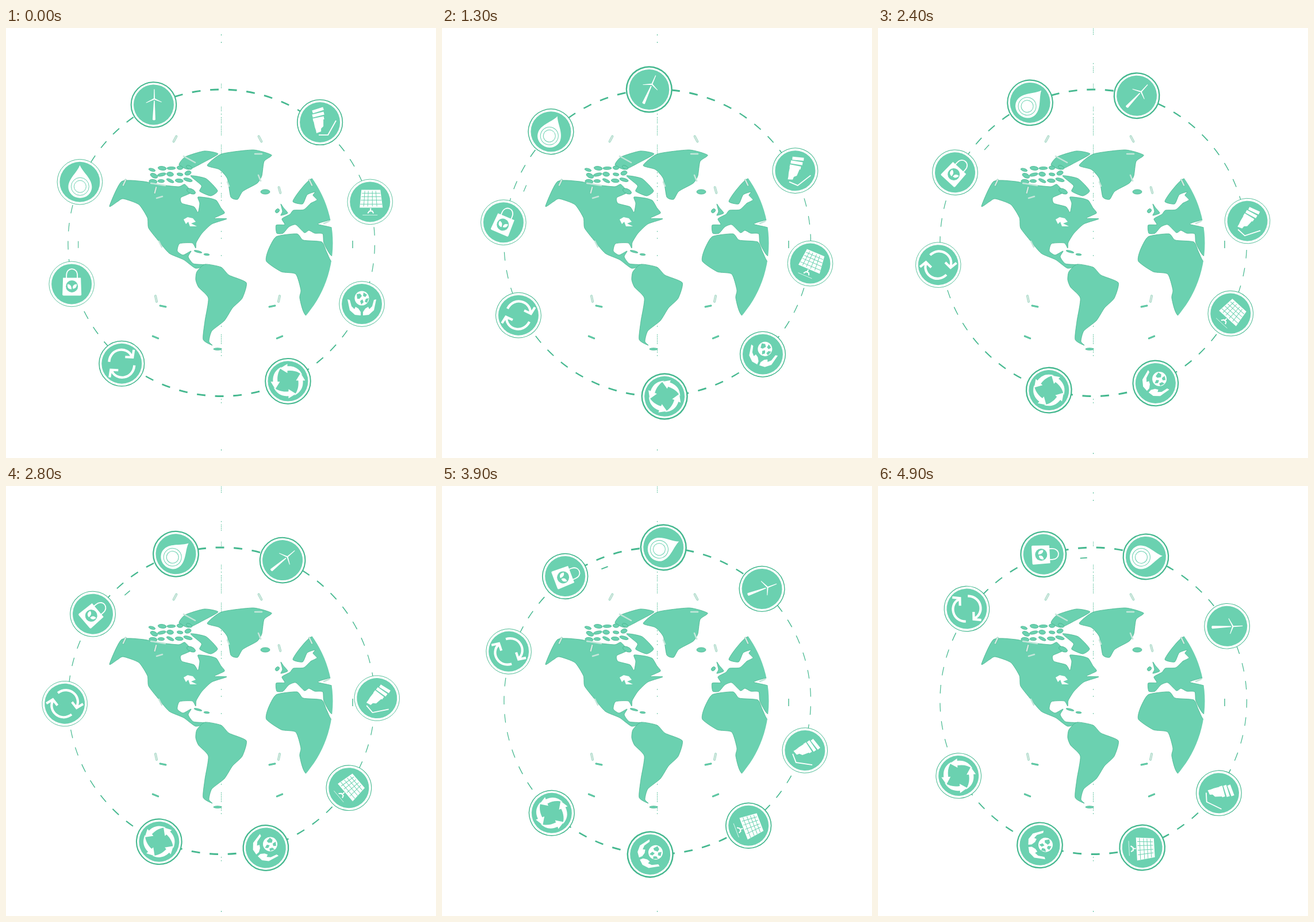
Recreate the animation shown at these times as an HTML page. Size 748 px wide and 748 px high, loop 5000 ms.

```html
<!DOCTYPE html>
<html lang="en">
<head>
<meta charset="utf-8">
<title>Green globe</title>
<style>
html, body { margin: 0; width: 100%; height: 100%; overflow: hidden; background: #fff; }
svg { display: block; width: 100vw; height: 100vh; }
.land { fill: #6bd1b0; stroke: #45b48d; stroke-width: .8; stroke-linejoin: round; }
.pale { stroke: #c5e6da; stroke-width: 2.5; stroke-linecap: round; fill: none; }
.line { stroke: #45b88f; fill: none; }
.w { fill: #fff; }
.ws { fill: none; stroke: #fff; }
.g { fill: #6bd1b0; }
.gs { fill: none; stroke: #6bd1b0; }
</style>
</head>
<body>
<svg viewBox="0 0 748 748">
  <clipPath id="limb"><circle cx="374" cy="374" r="194.5"/></clipPath>
  <g id="axis"></g>
  <g id="west"></g>
  <g id="east" clip-path="url(#limb)"></g>
  <g id="marks"></g>
  <g id="ring"></g>
  <g id="wheel"></g>
</svg>
<script>
const NS = 'http://www.w3.org/2000/svg';
const STEP = 100, STEPS = 50, TURN = 1.771;
const RING = 266.8, DASHES = 53, DASH = 3.2;
const [axis, west, east, marks, ring, wheel] =
  ['axis', 'west', 'east', 'marks', 'ring', 'wheel'].map(id => document.getElementById(id));

function add(parent, tag, attrs) {
  const el = document.createElementNS(NS, tag);
  for (const k in attrs) el.setAttribute(k, attrs[k]);
  parent.appendChild(el);
  return el;
}

let seed = 7;
const rnd = () => (seed = seed * 16807 % 2147483647) / 2147483647;

// angle in degrees, clockwise from the top
function polar(deg, r) {
  const a = deg * Math.PI / 180;
  return [r * Math.sin(a), -r * Math.cos(a)];
}

// lines look heaviest at the top and bottom of the wheel
const weight = (deg, min, max) =>
  min + (max - min) * Math.abs(Math.cos(deg * Math.PI / 180)) ** 3;

// closed, tight curve through a few coast points
function coast(parent, text) {
  const pts = text.split(' ').map(p => p.split(',').map(Number));
  const at = i => pts[(i + pts.length) % pts.length];
  const lean = (i, s) => at(i).map((v, k) => v + s * (at(i + 1)[k] - at(i - 1)[k]) / 10);
  const d = pts.map((_, i) => `C${lean(i, 1)} ${lean(i + 1, -1)} ${at(i + 1)}`).join('');
  add(parent, 'path', { class: 'land', d: `M${at(0)}${d}Z` });
}

function island(x, y, rx, ry, tilt) {
  add(west, 'ellipse', { class: 'land', rx, ry, transform: `translate(${x} ${y}) rotate(${tilt})` });
}

// North America
coast(west, '180,310 201,267 240,267 262,272 300,276 311,272 322,286 304,295 306,305 327,311 334,321 337,305 334,294 ' +
  '354,296 366,300 374,313 380,322 362,331 384,332 358,341 341,357 331,373 330,383 324,374 302,375 298,388 308,395 ' +
  '322,388 317,398 326,410 348,412 330,418 309,403 284,392 265,370 248,348 246,330 231,307 204,297 194,302');
// South America
coast(west, '332,424 346,411 374,416 388,430 418,443 411,470 394,487 380,509 358,527 353,545 359,552 343,542 346,510 352,470 335,451 330,438');
// Greenland, Ellesmere and Baffin
coast(west, '350,239 375,219 430,212 462,221 449,232 445,257 437,270 412,284 403,298 391,294 385,262 371,246');
coast(west, '301,238 312,224 345,214 369,219 343,234 318,246');
coast(west, '321,257 348,262 368,283 356,292 337,284 340,274');
// Africa and Europe run past the limb and are cut by it
coast(east, '470,363 506,358 517,369 549,372 557,388 566,406 580,406 580,501 523,501 511,470 513,456 504,428 479,424 453,406 456,387');
coast(east, '471,357 470,343 485,342 480,332 494,324 500,317 518,316 530,305 541,299 534,291 538,285 524,290 516,306 ' +
  '499,302 510,284 530,263 560,262 590,334 564,334 542,341 566,347 590,360 590,393 566,396 553,374 551,358 537,357 ' +
  '527,352 519,356 504,342 492,346 482,357');
// Britain
coast(east, '478,306 483,313 490,322 478,326 481,319');
island(472, 318, 4, 3, -45);
island(451, 285, 8, 4, 0);
island(334, 389, 7, 1.5, 15);
island(349, 394, 5, 1.5, 5);
island(368, 558.5, 7, 1.8, 0);
island(322, 284, 8, 4, 25);

// Arctic islands
for (let row = 0; row < 3; row++)
  for (let col = 0; col < 5; col++)
    island(254 + col * 15 + rnd() * 5, 244 + row * 11 - col + rnd() * 3, 5 + rnd() * 3, 2 + rnd() * 1.8, rnd() * 50 - 20);

add(marks, 'path', { class: 'w', d: 'M309 333L316 329 325 331 330 337 322 340 332 345 320 345 317 337 313 341Z' });
add(marks, 'path', { class: 'pale', d: 'M309 223L329 234M433 219H445M262 296L272 293M252 270L277 274M385 268L388 275M439 256L443 266M266 371L271 381M553 340L562 336' });

// loose strokes in mirrored pairs: x, y, tilt, pale
[
  [294, 193, -62, 1], [260, 282, -75, 1], [206, 269, -65, 1], [261, 471, 78, 1], [273, 484, 12, 0], [260, 538, 22, 0]
].forEach(([x, y, tilt, pale]) => [1, -1].forEach(side => {
  const seg = { d: 'M-5 0H5', 'stroke-linecap': 'round',
    transform: `translate(${368 + side * (x - 368)} ${y}) rotate(${side * tilt})` };
  add(marks, 'path', { ...seg, class: 'line', 'stroke-width': pale ? 4 : 3, opacity: pale ? .6 : 1 });
  add(marks, 'path', { ...seg, stroke: pale ? '#d3e7df' : '#6bd1b0', 'stroke-width': pale ? 2.6 : 1.4 });
}));
add(marks, 'path', { class: 'line', 'stroke-width': 1.4, d: 'M603 370V383' });

// centre line of scattered dots, denser above the globe
const dots = (from, to, chance) => {
  let d = '';
  for (let y = from; y < to; y += 3) if (rnd() < chance) d += `M374.5 ${y}v1.6`;
  return add(axis, 'path', { class: 'line', d });
};
dots(97, 106, 1);
dots(137, 212, .8);
dots(212, 570, .3);
dots(645, 660, .5);
const topDots = add(axis, 'path', { class: 'line', d: 'M374.5 11v2M374.5 24v2' });
const topLine = dots(1, 12, 1);
const upper = dots(55, 78, .8);
const foot = add(axis, 'path', { class: 'line', d: 'M374.5 733v2' });

const dashes = Array.from({ length: DASHES }, (_, i) => {
  const mid = -16.2 + i * 360 / DASHES;
  const a = polar(mid - DASH / 2, RING), b = polar(mid + DASH / 2, RING);
  return { mid, el: add(ring, 'path', { class: 'line', d: `M${a}A${RING} ${RING} 0 0 1 ${b}` }) };
});
const spur = add(ring, 'path', { class: 'line', d: 'M-249-3V9' });

const path = (cls, d, w) => `<path class="${cls}" d="${d}"${w ? ` stroke-width="${w}"` : ''}/>`;
const dot = (cls, x, y, r) => `<circle class="${cls}" cx="${x}" cy="${y}" r="${r}"/>`;
const spin = (n, s) => Array.from({ length: n }, (_, i) => `<g transform="rotate(${i * 360 / n})">${s}</g>`).join('');
const flip = s => s + `<g transform="scale(-1 1)">${s}</g>`;

const art = {
  turbine: path('w', 'M.2-7H1.8L3 26Q.5 28-2 26Z') +
    path('w', 'M0-11L.4-27H1.6L2-11 14-5 13.5-4.2 1-9-13-3-13.5-3.8Z'),
  lamp: path('ws', 'M-13-18L6-24M-13-11L7-16M-12-4L7-8', 5.4) +
    path('w', 'M-11-2L6-6V7L2 11V16L-6 19-7 14-9 8Z') + path('ws', 'M-2 22H14L28-3', 1.8),
  solar: path('w', 'M-15-21H18L22 10H-18Z') +
    path('gs', 'M-14-15H18M-15-9H19M-16-3H20M-17 4H21M-9-19L-11 8M-3-19L-4 8M4-19V8M10-19L12 8') +
    path('ws', 'M1 11V17M-4 20L-1 16H4L6 20', 2) + path('ws', 'M-13 23H13', .7),
  hands: dot('w', 0, -10, 12.5) +
    path('g', 'M-9-17L-3-18 0-14-4-9-8-9ZM3-20L9-16 6-12 2-14ZM-3-5L1-8 3-3-1 1ZM7-9L12-10 9-2 5-4Z') +
    flip(path('w', 'M-25-8L-21-7-18 4-13 9-11 5-6 8-2 14V20L-12 19-21 11Z')),
  cycle: spin(4, path('w', 'M-14-22L-1-30V-26C12-27 20-21 25-11 17-17 9-19-1-18V-14Z')),
  arrows: spin(2, path('ws', 'M-22-3C-20-28 10-30 17-13M21-24L19-11 6-11.5', 4.2)),
  bag: path('w', 'M-15-11H16L17 18Q17 20 15 20H-14Q-16 20-16 18Z') +
    path('ws', 'M-9-10V-15C-9-30 10-30 10-15V-10', 1.8) + dot('g', .5, 4, 10.5) +
    path('w', 'M0 9C-7 9-8 4-7 0-2 0 0 4 0 9ZM2 8C1 3 4 0 9 0 9 6 6 8 2 8Z'),
  drop: path('w', 'M0-29C5-17 21-6 21 9A20.5 19 0 0 1-20 9C-20-6-4-17 0-29Z') +
    dot('gs', .5, 8, 15.5) + dot('gs', .5, 8, 10.5)
};

// badges sit in opposite pairs: angle, distance, the two pictures
const badges = [
  [-25.9, 267.3, 'turbine', 'cycle'], [39.4, 271.6, 'lamp', 'arrows'],
  [74.6, 269.2, 'solar', 'bag'], [113.4, 267.3, 'hands', 'drop']
].flatMap(([deg, r, ...pair]) => pair.map((name, k) => {
  const mid = deg + k * 180;
  const g = add(wheel, 'g', { transform: `translate(${polar(mid, r)})` });
  const rim = add(g, 'circle', { r: 39.3, class: 'line', style: 'fill:#fff' });
  add(g, 'circle', { r: 35, class: 'g' });
  add(g, 'g', {}).innerHTML = art[name];
  return { mid, rim };
}));

const show = (el, on) => el.setAttribute('visibility', on ? 'visible' : 'hidden');

function draw(n) {
  const turn = n * TURN;
  ring.setAttribute('transform', `translate(374.7 373.7) rotate(${turn})`);
  wheel.setAttribute('transform', `translate(373.7 373.9) rotate(${turn})`);
  dashes.forEach(d => d.el.setAttribute('stroke-width', weight(d.mid + turn, 1.2, 3)));
  badges.forEach(b => b.rim.setAttribute('stroke-width', weight(b.mid + turn, .8, 2.5)));
  spur.setAttribute('stroke-width', weight(turn - 90, 1.1, 1.9));
  const mid = n >= 20 && n < 48;
  show(topLine, mid);
  show(topDots, !mid);
  show(upper, n >= 14 && n < 47);
  foot.setAttribute('transform', `translate(0 ${n < 15 ? 0 : 6})`);
}

let start = null;
function tick(now) {
  if (start === null) start = now;
  draw(Math.floor((now - start) / STEP) % STEPS);
  requestAnimationFrame(tick);
}
draw(0);
requestAnimationFrame(tick);
</script>
</body>
</html>
```
